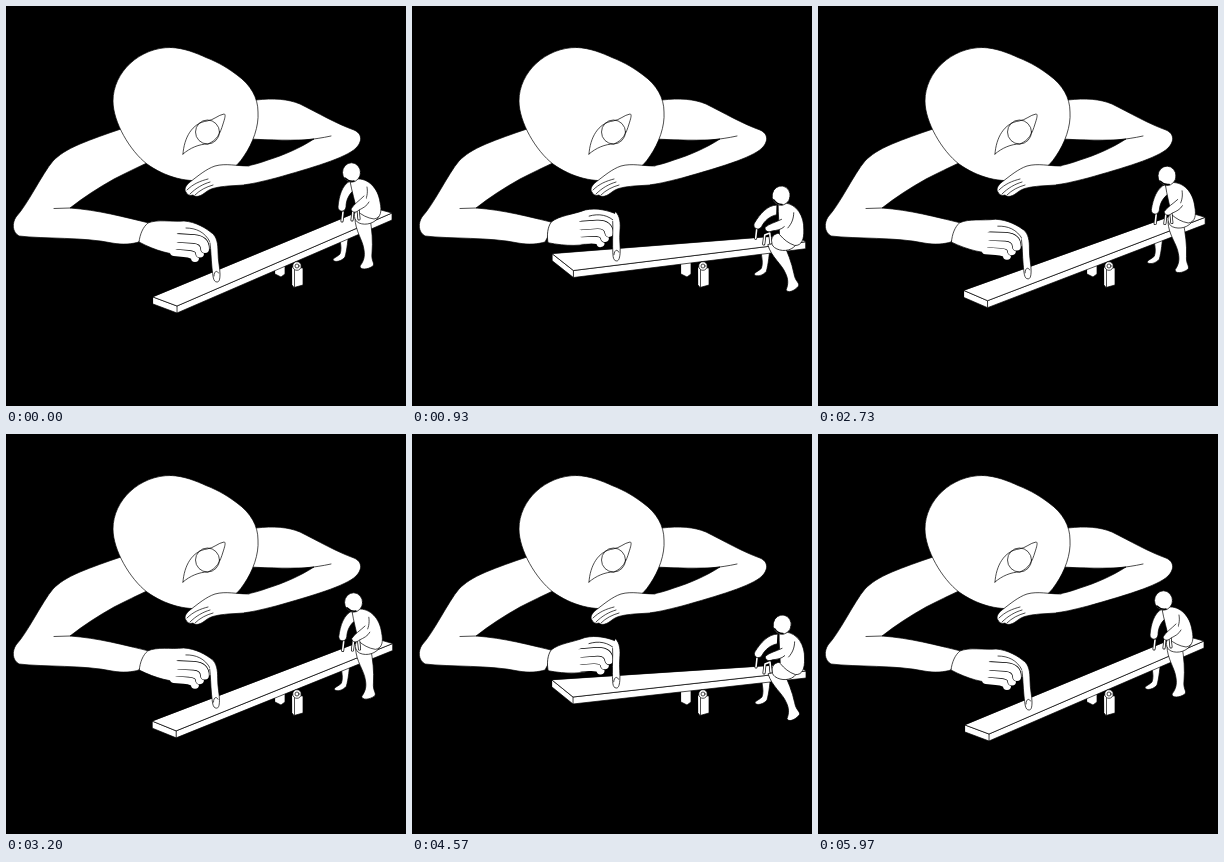
An HTML page for the animation above (6010 ms loop, 400x400 px).

```html
<!DOCTYPE html>
<html lang="en">
<head>
<meta charset="utf-8">
<title>Seesaw</title>
<style>
  html, body { margin: 0; width: 100%; height: 100%; overflow: hidden; background: #000; }
  svg { display: block; width: 100vw; height: 100vh; }
  path, circle, ellipse, polygon { fill: #fff; stroke: #000; stroke-width: .7; stroke-linejoin: round; stroke-linecap: round; }
  .line { fill: none; }
  .rod { fill: none; stroke-width: 3; }
  .rod.core { stroke: #fff; stroke-width: 1.6; }
  .finger { fill: none; stroke-width: 9.4; }
  .finger.core { stroke: #fff; stroke-width: 8; }
  .mouth { fill: none; stroke-width: 1.5; }
</style>
</head>
<body>
<svg viewBox="0 0 400 400">
  <g id="giant">
    <!-- arms -->
    <path d="M250 94C268 92 282 93 294 98C312 107 331 118 348 124C357 128 356 136 350 142C340 152 305 162 270 172C254 176 246 178 236 179L234 161C244 160 254 157 262 154C278 149 294 142 308 133C290 135 262 134 244 133Z"/>
    <path class="line" d="M300 134C308 133 316 132 325 130"/>
    <path d="M115 123C100 128 86 133 74 138C60 144 53 149 47 155C36 168 22 198 10 211C6 217 6 226 13 230C38 233 78 231 106 237C117 239 126 238 133 236L143 217C118 211 92 204 64 202C78 191 92 182 108 173C120 167 132 161 143 156Z"/>
    <path class="line" d="M48 202.500L64 202"/>
    <!-- head -->
    <path d="M165 41.500C178 42 190 47 200 51.500C214 57 223 63 231 69C245 79 252 92 252 106C253 120 247 137 238 150C230 163 217 170 203 173C183 178 159 171 141 158C124 145 107 116 107 95C107 66 134 41 165 41.500Z"/>
    <g id="open">
      <path class="line" d="M177 148C178 132 186 117 201 115C208 114 212 109 218 108C220 108 219 112 217 118C214 128 211 134 202 138C193 138 184 142 177 148Z"/>
      <circle class="line" cx="201.500" cy="126" r="12"/>
    </g>
    <path id="closed" class="line" d="M177 148C184 142 193 140 202 138C211 134 215 125 219 109"/>
    <!-- resting hand -->
    <path d="M243 160C230 160 220 157 209 160C200 163 192 170 184 176C179 180 178 184 180 186C181 189 184 190 187 189C190 192 195 190 200 186C205 182 212 181 222 180L238 179"/>
    <path class="line" d="M181 184C187 178 194 175 202 173M184 188C190 182 197 178 204 176M189 189C194 184 200 181 207 179"/>
  </g>

  <!-- rider's far leg -->
  <path data-move="16 15" d="M334 222C332 233 337 240 334 248C331 251 327 252 327 254C329 257 336 255 339 251C341 244 342 234 343 222Z"/>

  <!-- seesaw -->
  <path d="M269 257L279 255V268L275 271L269 268Z"/>
  <polygon id="side"/><polygon id="end"/><polygon id="top"/>
  <path d="M286 261L297 262V279L288 281.500L286 279ZM288.500 281V264"/>
  <circle cx="291" cy="260" r="4.300"/>
  <circle cx="291" cy="260" r="2"/>

  <!-- rider -->
  <g data-move="8 18">
    <path class="rod" d="M337 206L336 215"/><path class="rod core" d="M337 206L336 215"/>
  </g>
  <path data-move="19 25" data-turn="27 345 180" d="M344 175C336 179 333 190 332 201C332 206 339 207 340 201C340 194 343 188 348 184"/>
  <path data-move="7 27" data-turn="-17 353 212" d="M349 212C349 225 357 234 358 244C359 250 358 255 354 260C354 264 361 264 367 260C369 257 365 255 366 247C367 236 366 224 364 212Z"/>
  <path data-move="12 28" data-turn="14 362 207" d="M352 203C346 206 348 215 353 217C360 220 370 217 373 210L368 200"/>
  <g data-move="17 27" data-turn="11 364 205">
    <path d="M351 173C362 172 372 182 374 196C376 205 375 212 368 213C361 212 356 209 351 205C349 196 346 186 344 175Z"/>
    <path class="line" d="M361 181C362 187 361 192 358 197"/>
    <ellipse cx="345.500" cy="166.500" rx="9" ry="9.700"/>
    <path class="mouth" d="M339 172Q343 176 348 175"/>
  </g>
  <g data-move="6 25">
    <path class="rod" d="M346 214L347 205L352 203L353 213"/><path class="rod core" d="M346 214L347 205L352 203L353 213"/>
  </g>
  <path data-move="10 24" data-turn="20 358 196" d="M358 190C353 195 348 198 345 203C346 207 350 207 353 204C357 202 361 200 363 196"/>

  <!-- pointing hand -->
  <path data-turn="-17 137 226" d="M133 236C134 228 137 221 142 217C152 213 164 216 178 215C190 216 200 222 207 228L205 243L180 249C165 249 150 245 133 236"/>
  <path data-turn="-17 137 226" class="line" d="M180 222C190 222 199 226 204 236"/>
  <g id="fist" data-move="-2 -15" data-turn="-8 186 241"></g>
  <g data-move="-3 -22" data-turn="5 209 232">
    <path d="M206 227C211 231 212 238 212 246C212 255 214 262 214 268C214 274 213 276 211 276C207 276 207 270 206 262C205 252 205 244 204 237"/>
    <path class="line" d="M208 270C208 265 211 264 212.500 267"/>
  </g>
</svg>
<script>
const LOOP = 6010, HALF = 3000;
const UP_END = 1070, DOWN_START = 1750, DOWN_END = 2970;
const BLINK = [1470, 1570];
const THICK = 7;
const $ = id => document.getElementById(id);

// plank corners as [lowered, raised]
const plank = {
  farLeft: [[147, 291], [140, 246]],
  nearLeft: [[171, 300], [161, 263]],
  nearRight: [[386, 207], [394, 237]],
  farRight: [[364, 201], [384, 230]],
};

// curled fingers, the lowest one first
for (let i = 2; i >= 0; i--) {
  const x = 173 - i, y = 232 + 7 * i;
  const tipX = 199 - 5 * i, tipY = 243 + 4.5 * i;
  const bend = `L${tipX - 11} ${y + 1}Q${tipX} ${y + 2} ${tipX} ${tipY}`;
  for (const [cls, startX] of [['finger', x], ['finger core', x - 3]]) {
    const el = document.createElementNS('http://www.w3.org/2000/svg', 'path');
    el.setAttribute('class', cls);
    el.setAttribute('d', `M${startX} ${y}${bend}`);
    $('fist').append(el);
  }
}

const numbers = s => (s || '0 0 0').split(' ').map(Number);
const joints = [...document.querySelectorAll('[data-move], [data-turn]')].map(el => ({
  el, move: numbers(el.dataset.move), turn: numbers(el.dataset.turn),
}));

const ease = x => (1 - Math.cos(Math.PI * x)) / 2;

// 0: the giant's end is down, 1: it is raised
function lift(t) {
  if (t < UP_END) return ease(t / UP_END);
  if (t < DOWN_START) return 1;
  if (t >= DOWN_END) return 0;
  const x = (t - DOWN_START) / (DOWN_END - DOWN_START);
  return 1 - (x + ease(x)) / 2;
}

function drawPlank(p) {
  const at = name => plank[name][0].map((v, k) => v + (plank[name][1][k] - v) * p);
  const under = ([x, y]) => [x, y + THICK];
  const [fl, nl, nr, fr] = Object.keys(plank).map(at);
  const face = (id, ...pts) => $(id).setAttribute('points', pts.join(' '));
  face('top', fl, nl, nr, fr);
  face('side', nl, nr, under(nr), under(nl));
  face('end', fl, nl, under(nl), under(fl));
}

function draw(now) {
  const time = now % LOOP;
  const t = time < HALF ? time : time - HALF;
  const p = lift(t);
  drawPlank(p);
  for (const { el, move: [dx, dy], turn: [angle, cx, cy] } of joints) {
    el.setAttribute('transform', `translate(${dx * p} ${dy * p}) rotate(${angle * p} ${cx} ${cy})`);
  }
  const shut = t >= BLINK[0] && t < BLINK[1];
  $('open').style.display = shut ? 'none' : '';
  $('closed').style.display = shut ? '' : 'none';
}

const start = performance.now();
function tick() {
  draw(performance.now() - start);
  requestAnimationFrame(tick);
}
tick();
</script>
</body>
</html>
```
